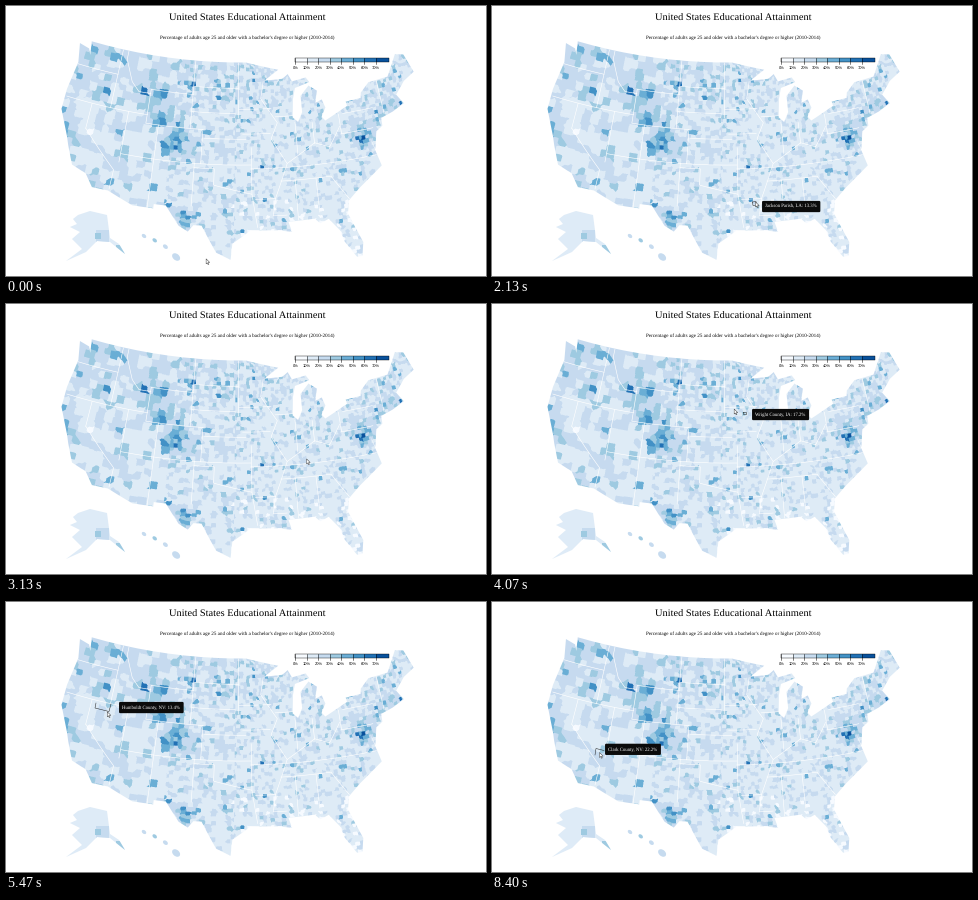
A matplotlib script for the animation above (8.99 s loop, 480 by 270 pixels).

```python
import itertools

import matplotlib.pyplot as plt
import numpy as np
from matplotlib.animation import FuncAnimation
from matplotlib.colors import to_rgb
from matplotlib.patches import Ellipse, PathPatch, Polygon, Rectangle
from matplotlib.path import Path

W, H, DPI = 480, 270, 100
PX = 72 / DPI
FRAMES, INTERVAL = 145, 62
plt.rcParams["text.hinting"] = "none"

BLUES = ["#f7fbff", "#deebf7", "#c6dbef", "#9ecae1",
         "#6baed6", "#4292c6", "#2171b5", "#08519c"]
RGB = np.array([to_rgb(c) for c in BLUES])

# Albers equal-area conic, parallels 29.5 and 45.5, in stage pixels
SCALE, X0, Y0, LON0 = 488, 235.4, -481.2, -96
S1, S2 = np.sin(np.radians([29.5, 45.5]))
N = (S1 + S2) / 2
C = 1 - S1 ** 2 + 2 * N * S1


def project(lon, lat):
    rho = np.sqrt(C - 2 * N * np.sin(np.radians(lat))) / N
    theta = N * np.radians(lon - LON0)
    return X0 + SCALE * rho * np.sin(theta), Y0 + SCALE * rho * np.cos(theta)


def unproject(x, y):
    u, v = (x - X0) / SCALE, (y - Y0) / SCALE
    lon = LON0 + np.degrees(np.arctan2(u, v)) / N
    sin_lat = (C - (u * u + v * v) * N * N) / (2 * N)
    return lon, np.degrees(np.arcsin(np.clip(sin_lat, -1, 1)))


def curve(flat):
    """Project a lon, lat, lon, lat, ... line with finely divided segments."""
    pts = np.reshape(flat, (-1, 2))
    s = np.linspace(0, len(pts) - 1, 10 * (len(pts) - 1) + 1)
    lon, lat = (np.interp(s, np.arange(len(pts)), pts[:, k]) for k in (0, 1))
    return np.column_stack(project(lon, lat))


# Key points of the outline, counter-clockwise from the north-west corner
PACIFIC_GULF = [
    -124.7, 48.4, -124, 46.2, -124.5, 42.8, -124.4, 40.4, -122.5, 37.7,
    -121.9, 36.6, -120.6, 34.5, -118.4, 33.9, -117.1, 32.5, -114.8, 32.5,
    -111.1, 31.3, -108.2, 31.3, -108.2, 31.8, -106.5, 31.8, -104.5, 29.6,
    -103.2, 29, -102.5, 29.8, -101.4, 29.8, -99.3, 26.7, -97.4, 25.9,
    -97.2, 27.8, -94.7, 29.4, -91.3, 29.3, -89.2, 29, -89.6, 30.2, -86, 30.3,
    -85.3, 29.7, -84.1, 30.1, -82.8, 28.6, -82.4, 27.2, -81.1, 25.2, -80.4, 25.2]
ATLANTIC_LAKES = [
    -80, 26.8, -81.4, 30.4, -81, 31.9, -79.3, 33.1, -77.9, 33.9, -75.5, 35.2,
    -76.4, 38.9, -75.9, 37.2, -75.2, 39.2, -74.1, 39.7, -74, 40.6, -72, 41,
    -70, 41.6, -70.8, 42.8, -69, 44.1, -67, 44.8, -67.8, 47.1, -69.2, 47.4,
    -71.4, 45.1, -74.7, 45, -76.3, 44, -76.5, 43.4, -79, 43.3, -78.9, 42.8,
    -82.7, 41.5, -83.2, 42, -82.4, 43, -82.8, 44, -83.9, 43.7, -83.4, 45.1,
    -84.7, 45.8, -86.2, 44.7, -86.2, 42.8, -87, 41.7, -87.8, 42.3, -87.5, 44.4,
    -87, 45.7, -84.5, 46.2, -85, 46.8, -87.4, 46.5, -88, 47.4, -89, 46.9,
    -92.1, 46.8, -89.6, 48, -95.2, 49, -122.8, 49, -122.4, 47.4, -122.9, 48.1]

# Most state borders follow a parallel (lat, west, east) or a meridian (lon, south, north)
PARALLELS = [(46, -124, -117), (45.95, -104, -96.5), (45, -111, -104), (43.5, -96.4, -91.2),
             (43, -104, -97), (42.5, -90.6, -87.8), (42, -124.2, -111), (42, -79.8, -75),
             (41, -111, -102), (40.6, -95.8, -91.5), (40, -102, -95.3), (39.7, -80.5, -75.6),
             (37, -114, -94.6), (36.55, -94.6, -75.9), (35, -90.3, -83), (33, -94, -91.2)]
MERIDIANS = [(-120, 39, 42), (-117, 42, 49), (-114.05, 36, 42), (-111.05, 41, 45),
             (-109.05, 31.3, 41), (-104.05, 41, 49), (-103, 32, 37), (-102.05, 37, 41),
             (-96.5, 42.5, 49), (-94.5, 33.6, 39), (-88.2, 30.3, 35), (-87.5, 38, 41.7),
             (-85.2, 31, 35), (-84.8, 39, 41.7), (-80.5, 39.7, 42), (-73.4, 41, 45)]
DIAGONALS = [
    [-120, 39, -114.6, 35, -114.7, 32.7],
    [-116, 49, -116, 48, -114.4, 45.5, -113, 44.5, -111, 44.5],
    [-103, 36.5, -100, 36.5, -100, 34.6, -94.5, 33.6, -93.8, 29.7],
    [-92.3, 46.7, -92.8, 44.7, -90.3, 41.8, -91.4, 40, -89.2, 37, -91.2, 33, -91.6, 31, -89.7, 31],
    [-89.2, 37, -84.8, 39.1, -82.6, 38.4, -80.6, 40.6],
    [-83, 35, -80.9, 32.1],
]

# lon, lat, added percentage, radius in degrees of the strongest regions
REGIONS = [(-106, 39.3, 34, 1.1), (-110.8, 43.8, 16, 1.2), (-122.3, 47.5, 14, 1.0),
           (-122.3, 37.8, 24, .8), (-117.2, 33, 16, .8), (-103.9, 30.2, 26, .8),
           (-77.3, 38.9, 32, .8), (-73, 41.6, 13, 1.8), (-117.2, 39.8, -6, 2.6)]

TABLE = np.random.default_rng(14).random((211, 211, 4))


def nearest_seed(lon, lat, w, h):
    """Seed position and noise of the jittered county cell at each point."""
    u, v = lon / w, lat / h
    best = np.full(u.shape, 9.0)
    out = np.zeros((4,) + u.shape)
    for di, dj in itertools.product((-1, 0, 1), repeat=2):
        i, j = np.floor(u).astype(int) + di, np.floor(v).astype(int) + dj
        noise = TABLE[i % 211, j % 211]
        su, sv = i + .15 + .7 * noise[..., 0], j + .15 + .7 * noise[..., 1]
        dist = np.maximum(abs(u - su), abs(v - sv))
        closer = dist < best
        best = np.where(closer, dist, best)
        out = np.where(closer, [su * w, sv * h, noise[..., 2], noise[..., 3]], out)
    return out


def county_image(sub=3):
    y, x = np.mgrid[0:H * sub, 0:W * sub] / sub + .5 / sub
    lon, lat = unproject(x, y)
    west = nearest_seed(lon, lat, 1.2, .85)
    plains = nearest_seed(lon, lat, .7, .5)
    east = nearest_seed(lon, lat, .52, .42)
    slon, slat, a, b = np.where(lon < -106.8, west, np.where(lon < -97, plains, east))
    # A long-tailed spread leaves a few dark counties among many pale ones
    value = 11 + .3 * (slat - 37) + 2.5 * (slon < -97) - 7.5 * np.log(1 - a)
    for clon, clat, amp, r in REGIONS:
        d2 = ((slon - clon) * .78) ** 2 + (slat - clat) ** 2
        value += amp * (.25 + 1.2 * b) * np.exp(-d2 / (2 * r * r))
    rgb = RGB[np.clip(value // 10, 0, 7).astype(int)]
    return rgb.reshape(H, sub, W, sub, 3).mean(axis=(1, 3))


fig = plt.figure(figsize=(W / DPI, H / DPI), dpi=DPI, facecolor="white")
ax = fig.add_axes([0, 0, 1, 1])


def label(x, y, text, size, family="Liberation Serif", **kw):
    kw = {"ha": "center", "va": "center_baseline", "color": "black", **kw}
    return ax.text(x, y, text, fontsize=size * PX, family=family, **kw)


# Mainland
image = ax.imshow(county_image(), extent=(0, W, H, 0), aspect="auto", interpolation="nearest")
land = PathPatch(Path(curve(PACIFIC_GULF + ATLANTIC_LAKES)), fc="none", ec="none")
ax.add_patch(land)
image.set_clip_path(land)
borders = ([[west, lat, east, lat] for lat, west, east in PARALLELS]
           + [[lon, south, lon, north] for lon, south, north in MERIDIANS] + DIAGONALS)
for border in borders:
    line, = ax.plot(*curve(border).T, color="white", lw=.6 * PX)
    line.set_clip_path(land)

# Alaska and Hawaii
ALASKA = [72, 209, 84, 205, 101, 209, 104, 232, 113, 238, 119, 248, 104, 236, 91, 235,
          80, 246, 60, 255, 76, 243, 66, 233, 74, 226, 64, 221, 71, 218, 67, 213]
alaska = Polygon(np.reshape(ALASKA, (-1, 2)), fc=BLUES[1], ec="none")
ax.add_patch(alaska)
for x, y, size, level in [(96, 230, 13, 2), (92, 230, 6, 3), (114, 243, 9, 3)]:
    area = Rectangle((x - size / 2, y - size / 2), size, size, fc=BLUES[level], ec="none")
    ax.add_patch(area)
    area.set_clip_path(alaska)
for k, size in enumerate([5, 5, 5.5, 9]):
    ax.add_patch(Ellipse((138 + 10.7 * k, 230 + 4 * k + k ** 3 / 3), size, size * .7, angle=40,
                         fc=BLUES[3 if k == 1 else 2], ec="none"))

# Headings and legend
label(241.5, 11, "United States Educational Attainment", 10.4)
label(241.5, 31, "Percentage of adults age 25 and older with a bachelor's degree "
      "or higher (2010-2014)", 5.14)
LEFT, RIGHT, CELL = 289.3, 383.3, 11.5
for k, color in enumerate(BLUES):
    x = LEFT + CELL * k
    ax.add_patch(Rectangle((x, 52), RIGHT - x, 4.2, fc=color, ec="none"))
    ax.plot([x, x], [52, 58], color="black", lw=.5 * PX)
    label(x, 61.3, f"{10 * k}%", 4, "Liberation Sans")
ax.add_patch(Rectangle((LEFT, 52), RIGHT - LEFT, 4.2, fc="none", ec="black", lw=.4 * PX))

# start, end, tooltip left and middle, text, county edge
TIPS = [
    (2060, 2330, 270, 200, "Jackson Parish, LA: 13.3%",
     [260.5, 196, 264, 195.5, 264.5, 199, 261, 199.5, 260.5, 196]),
    (3930, 4130, 260, 110, "Wright County, IA: 17.2%",
     [250.5, 107.5, 253.5, 107.5, 253.5, 110, 250.5, 110, 250.5, 107.5]),
    (5260, 5660, 113, 105, "Humboldt County, NV: 13.4%",
     [90, 101, 89, 106, 103, 109.5, 105, 102]),
    (6330, 9000, 113, 146.8, "Clark County, NV: 22.2%",
     [103, 153, 104, 146.5, 112, 148.5]),
]
tips = []
for start, end, x, y, text, edge in TIPS:
    line, = ax.plot(*np.reshape(edge, (-1, 2)).T, color="#222222", lw=.5 * PX)
    box = label(x + 3.4, y, text, 4.8, ha="left", color="white",
                bbox=dict(boxstyle="round,pad=0.7,rounding_size=0.25", fc="#0b0b0b", ec="none"))
    tips.append((start, end, (line, box)))

ARROW = np.array([[0, 0], [0, 5], [1.2, 4], [2, 5.8], [2.8, 5.4], [2, 3.7], [3.6, 3.6]])
cursor = Polygon(ARROW, fc="white", ec="#333333", lw=.45 * PX, zorder=9)
ax.add_patch(cursor)

# time, x, y of the pointer tip
PATH = np.array([
    (0, 199.5, 253.5), (1000, 223, 229), (1450, 318, 160), (1900, 300, 196),
    (2130, 264.5, 196), (2850, 283, 184), (3130, 300.5, 155), (3450, 322, 115),
    (4070, 241, 105), (4700, 165, 113), (5470, 102, 109.5), (6470, 107.5, 150.5)])
TIMES, TIP = PATH[:, 0], PATH[:, 1:]
SLOPES = np.gradient(TIP, TIMES, axis=0)


def pointer(t):
    """Smooth cubic path through the key points, at rest after the last."""
    t = min(t, TIMES[-1])
    k = min(np.searchsorted(TIMES, t, "right") - 1, len(TIMES) - 2)
    dt = TIMES[k + 1] - TIMES[k]
    s = (t - TIMES[k]) / dt
    ease = s * s * (3 - 2 * s)
    return (TIP[k] * (1 - ease) + TIP[k + 1] * ease
            + dt * s * (1 - s) * ((1 - s) * SLOPES[k] - s * SLOPES[k + 1]))


def update(i):
    t = (i + .5) * INTERVAL
    cursor.set_xy(ARROW + pointer(t))
    for start, end, artists in tips:
        for artist in artists:
            artist.set_visible(start <= t < end)
    return [cursor]


ax.set_xlim(0, W)
ax.set_ylim(H, 0)
ax.axis("off")
update(0)
anim = FuncAnimation(fig, update, frames=FRAMES, interval=INTERVAL, repeat=True, repeat_delay=0)
plt.show()
```
